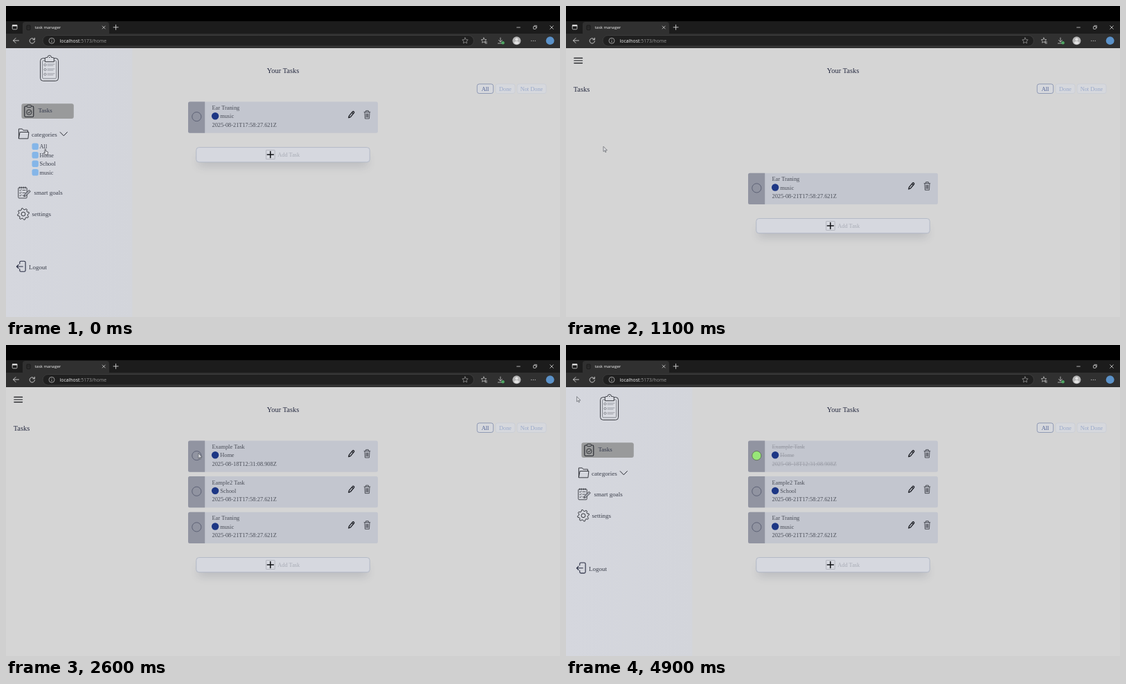
Write an HTML page with a canvas that moves like this. It is 800 px wide and 450 px high and loops after 5000 ms.

```html
<!DOCTYPE html>
<html lang="en">
<head>
<meta charset="utf-8">
<title>task manager</title>
<style>
html, body { margin: 0; width: 100%; height: 100%; overflow: hidden; background: #000; }
canvas { display: block; width: 800px; height: 450px; }
</style>
</head>
<body>
<canvas id="stage" width="800" height="450"></canvas>
<script>
const ctx = document.getElementById('stage').getContext('2d');
const LOOP = 5000, STEP = 100;
const SERIF = '"Liberation Serif", "Times New Roman", serif';
const SANS = '"Open Sans", "Noto Sans", sans-serif';
const INK = '#25272e', TEXT = '#3a3e4a';

function text(str, x, y, size, color, font = SERIF, align = 'left') {
  ctx.font = `${size}px ${font}`;
  ctx.textAlign = align;
  ctx.fillStyle = color;
  ctx.fillText(str, x, y);
}

function box(x, y, w, h, r, fill, stroke, width = 1) {
  ctx.beginPath();
  ctx.roundRect(x, y, w, h, r);
  paint(fill, stroke, width);
}

function disc(x, y, r, fill, stroke, width = 1) {
  ctx.beginPath();
  ctx.arc(x, y, r, 0, Math.PI * 2);
  paint(fill, stroke, width);
}

function shape(d, x, y, fill, stroke, width = 1) {
  const path = new Path2D(d);
  ctx.save();
  ctx.translate(x, y);
  ctx.lineJoin = ctx.lineCap = 'round';
  if (fill) { ctx.fillStyle = fill; ctx.fill(path); }
  if (stroke) { ctx.strokeStyle = stroke; ctx.lineWidth = width; ctx.stroke(path); }
  ctx.restore();
}

function paint(fill, stroke, width) {
  if (fill) { ctx.fillStyle = fill; ctx.fill(); }
  if (stroke) { ctx.strokeStyle = stroke; ctx.lineWidth = width; ctx.stroke(); }
}

function star(x, y, r, color) {
  let d = '';
  for (let i = 0; i < 10; i++) {
    const a = i * Math.PI / 5 - Math.PI / 2, k = i % 2 ? r * 0.48 : r;
    d += `${i ? 'L' : 'M'}${k * Math.cos(a)} ${k * Math.sin(a)}`;
  }
  shape(d + 'Z', x, y, null, color, 0.75);
}

function browser() {
  ctx.fillStyle = '#000';
  ctx.fillRect(0, 0, 800, 22);
  ctx.fillStyle = '#1c1c1c';
  ctx.fillRect(0, 22, 800, 18);
  ctx.fillStyle = '#303030';
  ctx.fillRect(0, 40, 800, 21);
  box(24, 23, 125, 18, [4, 4, 0, 0], '#303030');

  box(9.2, 27.5, 6.8, 6.3, 1.2, null, '#dedede', 0.8);
  ctx.fillStyle = '#dedede';
  ctx.fillRect(9, 27.2, 7.2, 2.2);
  box(30, 28, 5, 6.5, 1, null, '#151515', 0.9);
  shape('M31.5 30h2M31.5 32h2', 0, 0, null, '#151515', 0.6);
  text('task manager', 41.5, 33, 5.95, '#f0f0f0', SANS);
  shape('M-2-2L2 2M2-2L-2 2', 141.2, 31, null, '#d0d0d0', 0.8);
  shape('M-3.5 0h7M0-3.5v7', 158.6, 30.8, null, '#d4d4d4', 0.9);
  shape('M-2.3 0h4.6', 740, 31, null, '#d8d8d8', 0.8);
  box(761.5, 29.5, 3.8, 3.8, 0.7, null, '#d8d8d8', 0.8);
  shape('M763 28.3h3.4v3.5', 0, 0, null, '#d8d8d8', 0.7);
  shape('M-2.3-2.3L2.3 2.3M2.3-2.3L-2.3 2.3', 788, 31, null, '#d8d8d8', 0.8);

  shape('M4 0h-8M-.5-3.5L-4 0L-.5 3.5', 14.5, 50, null, '#d8d8d8', 0.9);
  shape('M3.2-1.8A3.7 3.7 0 1 0 3.7.6M3.6-4v2.5h-2.5', 37.8, 50.3, null, '#d8d8d8', 0.9);
  box(53, 42.5, 622.5, 15.5, 7.7, '#202020', '#424242', 0.8);
  disc(66, 50.3, 4, null, '#b9b9b9', 0.8);
  shape('M0 0v2M0-2v.2', 66, 50.3, null, '#b9b9b9', 0.8);
  text('localhost', 77.5, 52.6, 6.9, '#eeeeee', SANS);
  const hostEnd = 77.5 + ctx.measureText('localhost').width;
  text(':5173/home', hostEnd, 52.6, 6.9, '#969696', SANS);
  star(663, 50.3, 4.4, '#989898');
  star(690, 50, 4, '#c4c4c4');
  shape('M1.5 2h3M2 4h2.5', 690, 50, null, '#c4c4c4', 0.8);
  shape('M0-4v6M-2.5-.5L0 2L2.5-.5M-3.5 4h6', 714, 50, null, '#d0d0d0', 0.8);
  disc(717.5, 53.3, 2.3, '#4fa764');
  disc(737.4, 50.2, 6, '#b5b5b5');
  disc(737.4, 48.3, 2.1, '#e2e2e2');
  shape('M-3.6 3.8Q-3.6.8 0 .8T3.6 3.8Q0 6.4-3.6 3.8Z', 737.4, 50.2, '#e2e2e2');
  for (const dx of [-2.7, 0, 2.7]) disc(761.4 + dx, 50.3, 0.65, '#d5d5d5');
  disc(785.7, 50.2, 5.9, '#5b92c9');
}

function header() {
  text('Your Tasks', 400, 97, 10.42, '#262a40', SERIF, 'center');
  const filters = [['All', 680.3, 23.4], ['Done', 707, 28], ['Not Done', 738, 42]];
  filters.forEach(([label, x, w], i) => {
    box(x, 112.9, w, 13.6, 3, '#d6d8dd', i ? '#c8ccd6' : '#7886a8', 0.75);
    text(label, x + w / 2, 122.8, 8.33, i ? '#9aaacb' : '#4c5e92', SERIF, 'center');
  });
}

function closedMenu() {
  for (const y of [75.4, 79, 82.6]) shape('M11.8 0h11.8', 0, y, null, '#15161a', 1.2);
  text('Tasks', 10.7, 124.2, 10.42, '#262a40');
}

function bigClipboard() {
  box(49.6, 75.6, 26, 32.8, 4, '#dadce2', INK, 0.9);
  box(52.6, 79, 20, 26, 1.5, null, '#50535b', 0.65);
  shape('M56.3 80.3v-4q0-1.8 2-1.8h1.6q.3-3 2.9-3t2.9 3h1.6q2 0 2 1.8v4z', 0, 0, '#dadce2', INK, 0.9);
  disc(62.8, 74.4, 0.7, INK);
  for (const y of [85.2, 92, 98.8]) {
    disc(56.5, y, 1.6, null, '#50535b', 0.6);
    shape('M60 -1h10M60 1h8', 0, y, null, '#71747c', 0.6);
  }
}

function goalsIcon(y) {
  box(17.8, y - 7.2, 12.4, 15.2, 1.2, null, INK, 0.8);
  for (const x of [20, 22.7, 25.4, 28]) shape('M0-8.2v2', x, y, null, INK, 0.75);
  for (const dy of [-3.5, 0.3, 4.1]) {
    shape('M19.6 0l1 1l1.5-2M24 0h4', 0, y + dy, null, INK, 0.7);
  }
  shape('M26 5.4l.9-2.8l6.4-6.2l2 2l-6.4 6.2z', 0, y, '#a9acb5', INK, 0.75);
}

function gearIcon(x, y) {
  let d = '';
  for (let i = 0; i < 32; i++) {
    const a = (i + 0.5) * Math.PI / 16 - Math.PI / 8, r = i % 4 < 2 ? 8.4 : 6.4;
    d += `${i ? 'L' : 'M'}${r * Math.cos(a)} ${r * Math.sin(a)}`;
  }
  shape(d + 'Z', x, y, null, INK, 0.9);
  disc(x, y, 2.9, null, INK, 0.9);
}

function sidebar(expanded) {
  const shade = ctx.createLinearGradient(0, 0, 183, 0);
  shade.addColorStop(0, '#d5d7de');
  shade.addColorStop(1, '#d3d5db');
  ctx.fillStyle = shade;
  ctx.fillRect(0, 61, 182.5, 389);
  bigClipboard();

  box(22.4, 141.2, 75.4, 21.8, 3, '#999a9b');
  box(26.8, 145, 13, 15.5, 1.8, null, INK, 1.1);
  box(30.3, 143.2, 6, 3.4, 1, '#999a9b', INK, 0.9);
  disc(33.3, 153.7, 3.7, null, INK, 0.9);
  shape('M-1.7 0L-.4 1.4L2-1.3', 33.3, 153.7, null, INK, 0.9);
  text('Tasks', 46.5, 154.4, 9, '#363b4e');

  shape('M18.4 191.5v-13.6h5l1.6 2h6.4v2.6M18.4 191.5l1.7-9h12.8l-1 9z', 0, 0, null, INK, 0.9);
  text('categories', 37, 188.6, 9.1, TEXT);
  shape('M78.2 182.6l5.1 5.2l5.1-5.2', 0, 0, null, INK, 1);

  if (expanded) {
    ['All', 'Home', 'School', 'music'].forEach((label, i) => {
      const y = 203.3 + i * 12.5;
      box(37.5, y - 4.8, 9.4, 9.6, 2.8, '#85b6e8');
      text(label, 48.6, y + 3, 8.33, TEXT);
    });
  }

  const dy = expanded ? 0 : -54.2;
  goalsIcon(270 + dy);
  text('smart goals', 40.6, 273.2 + dy, 9, TEXT);
  gearIcon(25, 301 + dy);
  text('settings', 37.4, 304 + dy, 9, TEXT);
  shape('M20 373v-2q0-1.8 1.8-1.8h4.7q1.8 0 1.8 1.8v11.5q0 1.8-1.8 1.8h-4.7q-1.8 0-1.8-1.8v-2M24.5 377h-8.8M18.3 374.3l-2.7 2.7l2.7 2.7', -0.2, dy, null, '#262a40', 1.1);
  text('Logout', 33, 381.2 + dy, 9, TEXT);
}

function card(task, y, { alpha = 1, done = false, ink = '#4a4e58' } = {}) {
  ctx.save();
  ctx.globalAlpha = alpha;
  ctx.translate(0, y);
  box(263, 0, 274, 45.3, 2.5, '#c3c6cf');
  box(263, 0, 24.2, 45.3, [2.5, 0, 0, 2.5], '#9194a1');
  disc(275.3, 21.7, 6.6, done ? '#98e678' : null, done ? '#56664f' : '#50556a', 0.8);
  disc(302.1, 20.8, 5.2, '#1d3785');

  const color = done ? '#999ca5' : ink;
  const lines = [[task.title, 297.5], [task.group, 309.2], [task.date, 297.5]];
  lines.forEach(([str, x], i) => {
    const base = 11.5 + i * 12.4;
    text(str, x, base, 8.33, color);
    if (done) ctx.fillRect(x, base - 2.5, ctx.measureText(str).width, 0.6);
  });

  shape('M494.8 23.3l.7-2.9l5-5.9q.9-.8 1.8 0t.2 1.8l-5 5.9zM499.6 15.8l1.8 1.6', 0, 0, null, '#1a1c22', 1.3);
  shape('M517.2 15h8.6M519.7 14.8v-1.8h3.6v1.8M518 15.4l.5 9.2h6l.5-9.2M520 17.4v5.2M521.5 17.4v5.2M523 17.4v5.2', 0, 0, null, '#30333a', 0.8);
  ctx.restore();
}

function addBox(y) {
  ctx.save();
  ctx.shadowColor = 'rgba(30,35,55,.14)';
  ctx.shadowBlur = 13;
  ctx.shadowOffsetY = 9;
  box(277.3, y + 2.6, 245.4, 16.1, 4, '#d6d8df');
  ctx.restore();
  box(274.7, y, 250.6, 21.3, 4, '#d6d8df', '#a9b1c0', 0.75);
  box(375.6, y + 4, 12.6, 13, 0.5, null, '#a7aab2', 0.7);
  shape('M-4.5 0h9M0-4.5v9', 381.8, y + 10.5, null, '#111216', 1.5);
  text('Add Task', 392.2, y + 13.5, 8.33, '#a9adb6');
}

const tasks = [
  { title: 'Example Task', group: 'Home', date: '2025-08-18T12:31:08.908Z' },
  { title: 'Eample2 Task', group: 'School', date: '2025-08-21T17:58:27.621Z' },
  { title: 'Ear Traning', group: 'music', date: '2025-08-21T17:58:27.621Z' },
];
const TOP = 138.4, PITCH = 51.65;
const clamp = v => Math.min(1, Math.max(0, v));

function taskList(t) {
  if (t < 1100) {
    card(tasks[2], TOP);
    addBox(204.6);
    return;
  }
  const p = clamp((t - 1200) / 900);
  const fading = t >= 1300 && t < 2500;
  for (const i of [0, 1]) {
    card(tasks[i], TOP + i * PITCH - 4.5 * (1 - p), { alpha: p, done: i === 0 && t >= 3000 });
  }
  card(tasks[2], TOP + 2 * PITCH, { ink: fading ? '#34373f' : undefined });
  addBox(307.5);
}

// time, x, y of the pointer tip
const route = [
  [0, 54, 203.6], [1200, 54, 203.6], [1700, 219.2, 147.8], [1900, 219.2, 147.8],
  [2400, 277.8, 157], [3300, 277.8, 157], [3500, 218.6, 137.6], [3900, 20, 65],
  [4300, 15.6, 75], [LOOP, 15.6, 75],
];

function pointer(t) {
  if (t < 800) {
    shape('M56 212V207.4q.7-1.2 1.4 0V210l2.6.7q.8.3.6 1.4l-.6 3.2h-3.2l-2.3-3q.2-1 1.5-.3z', 0, 0, '#e0e1e5', '#33363d', 0.7);
    return;
  }
  const i = route.findIndex((stop, n) => n && t <= stop[0]);
  const [t0, x0, y0] = route[i - 1], [t1, x1, y1] = route[i];
  const k = (t - t0) / (t1 - t0);
  shape('M0 0v7l1.7-1.5l1.2 2.6l1.1-.5l-1.2-2.5h2.2z', x0 + (x1 - x0) * k, y0 + (y1 - y0) * k, '#dedfe3', '#4c4f57', 0.6);
}

function draw(t) {
  ctx.fillStyle = '#d5d5d5';
  ctx.fillRect(0, 0, 800, 450);
  browser();
  if (t < 800) sidebar(true);
  else if (t >= 4700) sidebar(false);
  else closedMenu();
  header();
  taskList(t);
  pointer(t);
}

const start = performance.now();
function tick() {
  const t = (performance.now() - start) % LOOP;
  draw(Math.floor(t / STEP) * STEP);
  requestAnimationFrame(tick);
}
tick();
</script>
</body>
</html>
```
